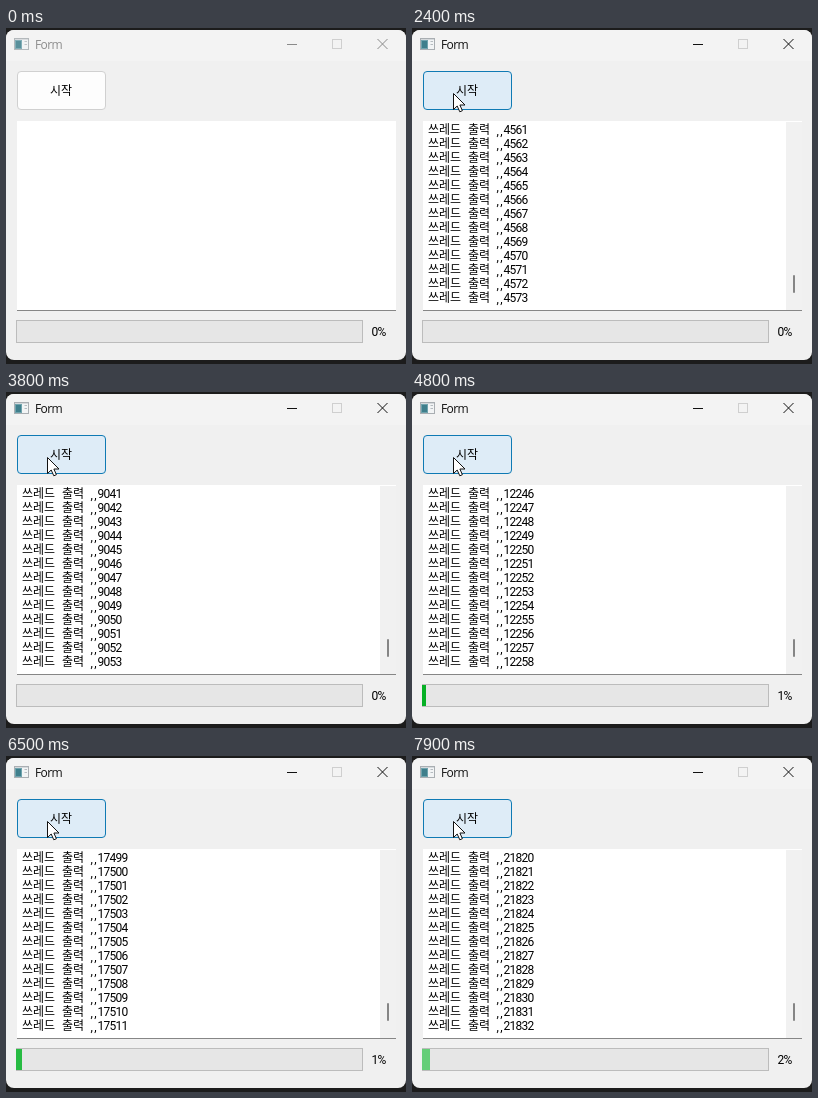
These frames come from a looping animation (400 px wide and 336 px high, 8 s). An HTML page:

```html
<!DOCTYPE html>
<html lang="ko">
<head>
<meta charset="utf-8">
<title>Form</title>
<style>
  html, body { margin: 0; width: 100%; height: 100%; overflow: hidden; background: #1c1c1c; }
  svg { display: block; width: 100vw; height: 100vh; }
  text { fill: #000; white-space: pre; }
  .title { font: 12px "Open Sans", "Noto Sans", sans-serif; letter-spacing: -.6px; }
  .hangul { font: 12px "Noto Sans CJK KR", "Noto Sans CJK", sans-serif; }
  .digits { font: 12px Roboto, "Liberation Sans", sans-serif; letter-spacing: -.74px; }
  .commas { font: 12px Roboto, "Liberation Sans", sans-serif; letter-spacing: 1.4px; }
</style>
</head>
<body>
<svg viewBox="0 0 400 336" xmlns="http://www.w3.org/2000/svg">
  <rect width="400" height="336" fill="#1c1c1c"/>
  <rect y="2" width="400" height="330" rx="8" fill="#f0f0f0"/>
  <path d="M0 33V10a8 8 0 0 1 8-8H392a8 8 0 0 1 8 8V33z" fill="#f3f3f3"/>

  <g id="appIcon">
    <rect x="8.5" y="10.5" width="14" height="11" fill="#f2f4f5" stroke="#a9aeb2"/>
    <rect x="9" y="11" width="13" height="1" fill="#d5d9dc"/>
    <rect x="9" y="12" width="7" height="9" fill="#6fa3ad"/>
    <rect x="10" y="13" width="5" height="7" fill="#3f7f8c"/>
    <path d="M18.5 13.5h2.5M18.5 16.5h2.5" stroke="#b5bbc0"/>
  </g>
  <text id="title" class="title" x="29" y="21">Form</text>
  <g id="controls" fill="none">
    <path d="M281 16.5H291"/>
    <path d="M371.5 11L381.5 21M381.5 11L371.5 21"/>
  </g>
  <rect x="326.5" y="11.5" width="9" height="9" fill="none" stroke="#cfcfcf"/>

  <rect id="button" x="11.5" y="43.5" width="88" height="38" rx="3.5"/>
  <text class="hangul" x="55" y="67" text-anchor="middle">시작</text>

  <rect x="11" y="93" width="379" height="189" fill="#fff"/>
  <path d="M11 282.5H390" stroke="#868686"/>
  <g id="output">
    <rect x="374" y="94" width="16" height="188" fill="#f1f1f1"/>
    <rect x="381" y="247" width="2" height="18" rx="1" fill="#858585"/>
    <g id="lines"></g>
  </g>

  <rect x="10.5" y="292.5" width="346" height="22" fill="#e6e6e6" stroke="#bcbcbc"/>
  <rect id="bar" x="10" y="293" height="21" fill="#06b025"/>
  <rect id="glow" x="10" y="293" height="21" fill="#fff"/>
  <text id="percent" class="digits" x="365.5" y="308"></text>

  <path id="cursor" d="M.5.5V16.5L4.2 13 6.8 18.8 9.4 17.7 6.9 12H12z" fill="#fff" stroke="#111" stroke-linejoin="round"/>
</svg>
<script>
  const LOOP = 8000, STEP = 100, ROWS = 13, TOTAL = 1e6;
  const CLICK = 900, START = 1006;
  const GLOW_PERIOD = 1230, GLOW_PEAK = 520;
  const COUNTS = [[START, 0], [1200, 635], [2400, 4573], [3800, 9053],
                  [4800, 12258], [6500, 17511], [7900, 21832]];
  const $ = id => document.getElementById(id);
  const set = (el, attrs) => { for (const k in attrs) el.setAttribute(k, attrs[k]); };
  const clamp = v => Math.min(1, Math.max(0, v));
  const mix = (a, b, p) => a + (b - a) * p;

  function addText(cls, x, y, content) {
    const el = document.createElementNS("http://www.w3.org/2000/svg", "text");
    set(el, { class: cls, x, y });
    el.textContent = content;
    return $("lines").appendChild(el);
  }

  const numbers = Array.from({ length: ROWS }, (_, i) => {
    const y = 106 + 14 * i;
    addText("hangul", 16, y, "쓰레드");
    addText("hangul", 56, y, "출력");
    addText("commas", 84.5, y + 1, ",,");
    return addText("digits", 91.5, y, "");
  });

  function countAt(t) {
    if (t < START) return 0;
    let i = 1;
    while (i < COUNTS.length - 1 && COUNTS[i][0] < t) i++;
    const [t0, n0] = COUNTS[i - 1], [t1, n1] = COUNTS[i];
    return Math.round(mix(n0, n1, (t - t0) / (t1 - t0)));
  }

  function drawWindow(t) {
    const active = t >= CLICK;
    set($("title"), { style: `fill:${active ? "#111" : "#8c8c8c"}` });
    set($("controls"), { stroke: active ? "#111" : "#8a8a8a" });
    set($("appIcon"), { opacity: active ? 1 : .85 });

    const p = clamp((t - 100) / 600), ease = 1 - (1 - p) ** 2;
    const x = mix(130, 41, ease), y = mix(308, 65, ease);
    set($("cursor"), { transform: `translate(${x} ${y})`, visibility: t < 100 ? "hidden" : "visible" });

    const hover = t >= 100 && x < 100 && y < 82;
    const pressed = t >= CLICK && t < 1100;
    set($("button"), {
      fill: pressed ? "#cce4f7" : hover ? "#deecf7" : "#fdfdfd",
      stroke: hover ? "#0f7ab4" : "#d0d0d0"
    });
  }

  function drawOutput(n) {
    set($("output"), { visibility: n ? "visible" : "hidden" });
    numbers.forEach((el, i) => { el.textContent = n - ROWS + 1 + i; });
  }

  function drawProgress(t, n) {
    const percent = Math.floor(n * 100 / TOTAL);
    const width = percent ? Math.round(346 * n / TOTAL) : 0;
    const phase = (t + GLOW_PERIOD - GLOW_PEAK) % GLOW_PERIOD;
    const distance = Math.min(phase, GLOW_PERIOD - phase);
    set($("bar"), { width });
    set($("glow"), { width, opacity: .38 * clamp(1 - distance / 260) });
    $("percent").textContent = percent + "%";
  }

  function frame(now) {
    const t = Math.floor(now % LOOP / STEP) * STEP;
    const n = countAt(t);
    drawWindow(t);
    drawOutput(n);
    drawProgress(t, n);
    requestAnimationFrame(frame);
  }
  frame(0);
</script>
</body>
</html>
```
